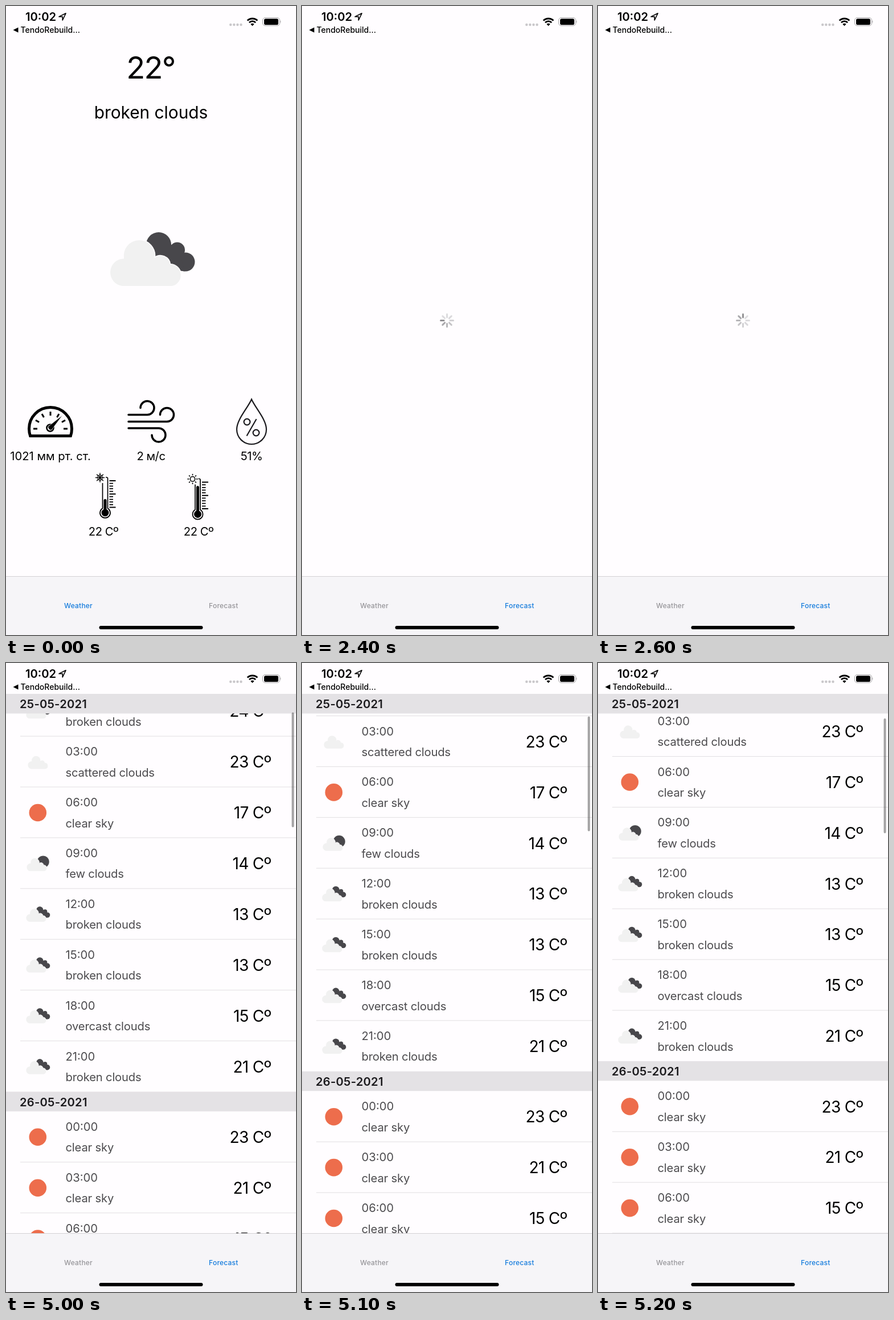
Animation of 509x1101 px, one loop 7.5 s. Source, as an HTML page:

```html
<!DOCTYPE html>
<html lang="en">
<head>
<meta charset="utf-8">
<title>Weather app</title>
<style>
  html, body { margin: 0; width: 100%; height: 100%; overflow: hidden; background: #fffdff; }
  svg { display: block; width: 509px; height: 1101px; }
  text { font-family: Inter, Roboto, sans-serif; font-size: 20.2px; }
  .mid { text-anchor: middle; }
  .tight { letter-spacing: -.5px; }
  .line { fill: none; stroke: #000; }
  .cell { fill: #4c4b4e; }
  .desc { letter-spacing: -.17px; }
  .temp { font-size: 28px; letter-spacing: -.7px; text-anchor: end; }
  .date { font-weight: 600; letter-spacing: .22px; fill: #1b1a1d; }
  .tab { font-size: 12px; font-weight: 500; letter-spacing: .2px; text-anchor: middle; }
</style>
</head>
<body>
<svg viewBox="0 0 509 1101">
  <defs>
    <path id="cloud" d="M-51.5 46.5A24 24 0 0 1 -48.2 -1.3A27 27 0 1 1 5 -2.5A17 17 0 0 1 32.4 8.8A19 19 0 0 1 35.5 46.5Z"
      fill="#f1f1f1" stroke="#fffdff" stroke-width="3" paint-order="stroke"/>
    <g id="broken">
      <g fill="#48474b">
        <circle cx="12.5" cy="-25.5" r="22"/>
        <circle cx="45" cy="-16.5" r="13.5"/>
        <circle cx="59.5" cy="4.5" r="16.5"/>
        <path d="M0-8 30-30 50-10 58 21 36 18Z"/>
      </g>
      <use href="#cloud"/>
    </g>
    <g id="few">
      <circle cx="33" cy="-10" r="37.5" fill="#48474b"/>
      <use href="#cloud" x="4" y="1"/>
    </g>
    <g id="scattered"><use href="#cloud" x="11" y="-3"/></g>
    <g id="clear"><circle r="54" fill="#ed6d4c"/></g>
    <g id="thermo">
      <path class="line" stroke-width="1.7" d="M169.5 835V879.3A9 9 0 1 0 178.5 879.3V827Q178.5 825 176.5 825H175"/>
      <circle cx="174" cy="887" r="6.5"/>
      <path class="scale line" stroke-width="1.8"/>
    </g>
  </defs>

  <rect width="509" height="1101" fill="#fffdff"/>

  <g id="weather">
    <text class="mid" x="254" y="127" style="font-size:54px;letter-spacing:-1.6px">22°</text>
    <text class="mid" x="254.5" y="196.5" style="font-size:29.8px">broken clouds</text>
    <use href="#broken" x="255.5" y="443.5"/>

    <path class="line" stroke-width="5" d="M42.6 752.5A37.5 37.5 0 0 1 40.5 740A37.5 37.5 0 0 1 115.5 740A37.5 37.5 0 0 1 113.4 752.5Z"/>
    <g id="ticks" class="line" stroke-width="3"></g>
    <circle class="line" cx="77.5" cy="738.5" r="6" stroke-width="2.6"/>
    <path d="M73.5 736.5 99 716.5 80 742Q75.5 743.5 73.5 736.5Z" stroke="#fffdff" stroke-width=".6"/>

    <g class="line" stroke-width="3.5" stroke-linecap="round">
      <path d="M215 715.5H248A12 12 0 1 0 236 703.5"/>
      <path d="M215 727.5H282.5A12 12 0 1 0 270.5 715.5"/>
      <path d="M215 739H268A12 12 0 1 1 256 751"/>
    </g>

    <g fill="none" stroke="#1c1b1f" stroke-width="2.2">
      <path d="M431 688.5C424 704 405 724 405 741A26 26 0 0 0 457 741C457 724 438 704 431 688.5Z"/>
      <circle cx="423" cy="728" r="5.4"/>
      <circle cx="439" cy="747" r="5.4"/>
      <path d="M439.5 723 422.5 752.5"/>
    </g>

    <use href="#thermo"/>
    <path class="line" stroke-width="5" stroke-linecap="round" d="M174 865.5V885"/>
    <g id="flake" class="line" stroke-width="1.4" transform="translate(165 825.5)"></g>
    <use href="#thermo" x="162.5" y="2.5"/>
    <path class="line" stroke-width="5" stroke-linecap="round" d="M336.5 842.5V887"/>
    <g id="sun" class="line" stroke-width="1.6" transform="translate(327.5 828)"><circle r="4.2"/></g>

    <g class="mid">
      <text x="78" y="795">1021 мм рт. ст.</text>
      <text class="tight" x="254.5" y="795">2 м/с</text>
      <text class="tight" x="431" y="795">51%</text>
      <text class="tight" x="171" y="927">22 Cº</text>
      <text class="tight" x="338" y="927">22 Cº</text>
    </g>
  </g>

  <g id="spinner" stroke-width="3" stroke-linecap="round" transform="translate(254.5 550.5)"></g>

  <g id="forecast">
    <g id="list"></g>
    <rect width="509" height="54" fill="#fffdff"/>
    <rect y="54" width="509" height="34.4" fill="#e4e2e5"/>
    <text class="date" x="24" y="79.3">25-05-2021</text>
    <rect id="bar" x="501.5" width="4" height="201" rx="2" fill="#000" opacity=".36"/>
  </g>

  <g id="status">
    <text x="34" y="26.3" font-weight="600">10:02</text>
    <path class="line" stroke-width="1.6" stroke-linejoin="round" d="M105 12.8 93 18.8H99.2V25Z"/>
    <path d="M12.5 42 21.5 37.5V46.5Z"/>
    <text x="25.5" y="47" style="font-size:14px;font-weight:500">TendoRebuild…</text>
    <g id="dots" fill="#c9c7ca"></g>
    <g class="line" stroke-width="2.8">
      <path d="M423.7 25.6A12.5 12.5 0 0 1 441.3 25.6"/>
      <path d="M426.9 29A7.9 7.9 0 0 1 438.1 29"/>
    </g>
    <path d="M432.5 35 429.4 31.7A4.4 4.4 0 0 1 435.6 31.7Z"/>
    <rect x="450.5" y="20.5" width="30" height="14" rx="4.5" fill="none" stroke="#a5a3a6"/>
    <rect x="453" y="22.2" width="25" height="10.8" rx="2.8"/>
    <path d="M481.5 25.3Q483.5 27.5 481.5 29.8Z" fill="#a5a3a6"/>
  </g>

  <rect y="998" width="509" height="103" fill="#f6f5f8"/>
  <rect y="998" width="509" height="1" fill="#d3d1d4"/>
  <text id="tabWeather" class="tab" x="127" y="1054.4">Weather</text>
  <text id="tabForecast" class="tab" x="381.8" y="1054.4">Forecast</text>
  <rect x="163.5" y="1085" width="182" height="6" rx="3"/>
</svg>

<script>
const LOOP = 7500, ROW = 88.9, HEAD = 34.4, LIST_TOP = 39.2;
const $ = id => document.getElementById(id);
const times = (n, make) => Array.from({ length: n }, (_, i) => make(i)).join('');

// Radial strokes between two radii, angles in degrees
const ray = (a, r1, r2, cx = 0, cy = 0) => {
  const c = Math.cos(a * Math.PI / 180), s = Math.sin(a * Math.PI / 180);
  return `<path d="M${cx + r1 * c} ${cy + r1 * s}L${cx + r2 * c} ${cy + r2 * s}"/>`;
};
const rays = (n, step, from, r1, r2, cx, cy) =>
  times(n, i => ray(from + i * step, r1, r2, cx, cy));

$('ticks').innerHTML = rays(7, 30, 180, 23, 30, 78, 740);
$('sun').innerHTML += rays(8, 45, 0, 6.4, 9);
$('flake').innerHTML = rays(8, 45, 0, 0, 8.2) + '<circle r="4.8" stroke-width="1"/>';
$('spinner').innerHTML = rays(8, 45, 0, 5.5, 11);
$('dots').innerHTML = times(4, i => `<circle cx="${394.2 + i * 6.1}" cy="32.7" r="2.2"/>`);
document.querySelector('.scale').setAttribute('d',
  times(11, i => `M181.5 ${831 + i * 4.65}H${i % 5 ? 188 : 192.5}`));

const days = [
  ['25-05-2021', [
    ['broken', 24], ['scattered', 23], ['clear', 17], ['few', 14],
    ['broken', 13], ['broken', 13], ['broken', 15, 'overcast clouds'], ['broken', 21]]],
  ['26-05-2021', [['clear', 23], ['clear', 21], ['clear', 15]]]
];
const names = { broken: 'broken clouds', scattered: 'scattered clouds', clear: 'clear sky', few: 'few clouds' };

function cell([icon, temp, label = names[icon]], hour, y, line) {
  return `<g transform="translate(0 ${y})">
    <use href="#${icon}" transform="translate(55.8 45) scale(.283)"/>
    <text class="cell" x="104.5" y="34">${String(hour).padStart(2, '0')}:00</text>
    <text class="cell desc" x="104.5" y="70.5">${label}</text>
    <text class="temp" x="465.3" y="55.3">${temp} Cº</text>
    ${line ? `<rect x="25" y="${ROW - .5}" width="484" height="1" fill="#e1dfe2"/>` : ''}
  </g>`;
}

let y = LIST_TOP - HEAD, html = '';
days.forEach(([date, rows], d) => {
  html += `<rect y="${y}" width="509" height="${HEAD}" fill="#e4e2e5"/>
    <text class="date" x="24" y="${y + 25.2}">${date}</text>`;
  y += HEAD;
  rows.forEach((row, i) => {
    html += cell(row, i * 3, y, d || i < rows.length - 1);
    y += ROW;
  });
});
$('list').innerHTML = html;

// [time, list offset, scroll bar top]
const scroll = [[5000, 0, 86.5], [5100, -35.6, 93.5], [5200, -53.5, 97]];
const shades = ['#929194', '#a9a8ab', '#b7b6b9', '#c5c4c7', '#d1d0d3', '#d9d8db', '#dcdbde', '#dedde0'];
const show = (id, on) => $(id).setAttribute('display', on ? 'inline' : 'none');

function draw(t) {
  const first = t < 2400, loading = !first && t < 5000;
  show('weather', first);
  show('spinner', loading);
  show('forecast', t >= 5000);
  $('tabWeather').setAttribute('fill', first ? '#147bdc' : '#969599');
  $('tabForecast').setAttribute('fill', first ? '#969599' : '#147bdc');

  // Leading spoke starts at the left and turns clockwise
  const lead = 4 + Math.min(3, Math.max(0, Math.floor((t - 2400) / 100)));
  [...$('spinner').children].forEach((p, i) =>
    p.setAttribute('stroke', shades[(lead - i + 8) % 8]));

  const [, dy, bar] = scroll.filter(s => t >= s[0]).pop() || scroll[0];
  $('list').setAttribute('transform', `translate(0 ${dy})`);
  $('bar').setAttribute('y', bar);
}

const start = performance.now();
function tick() {
  draw((performance.now() - start) % LOOP);
  requestAnimationFrame(tick);
}
tick();
</script>
</body>
</html>
```
